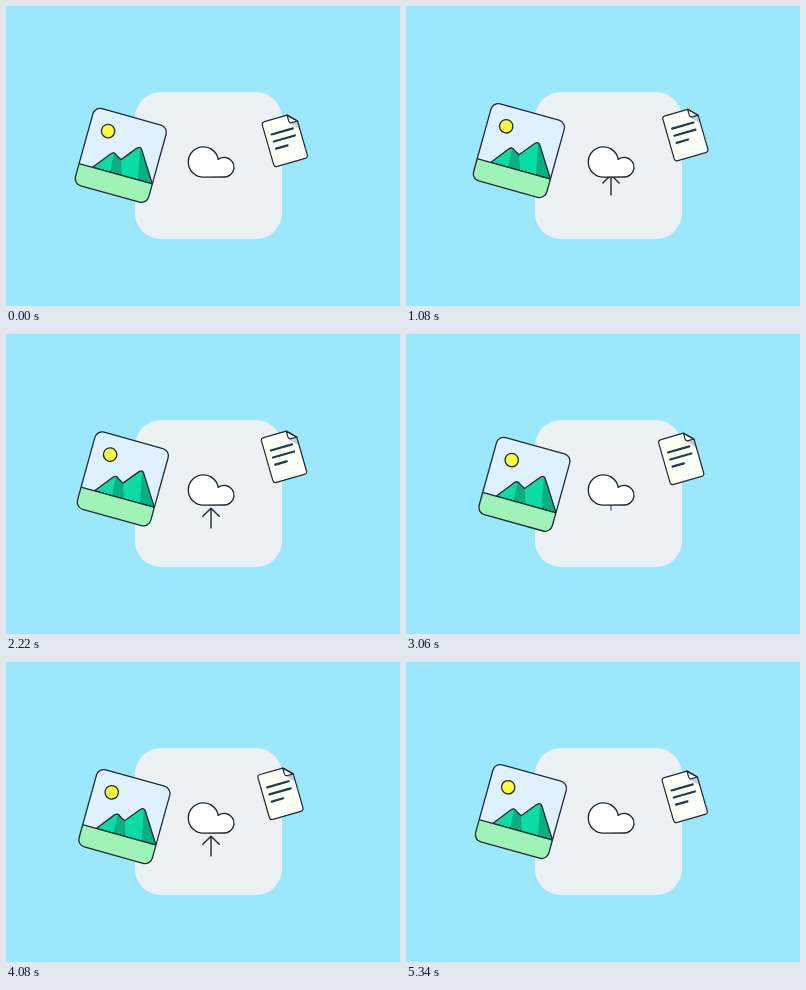
Write an HTML page with a canvas that moves like this. It is 394 by 300 pixels and loops after 5370 ms.

```html
<!DOCTYPE html>
<html lang="en">
<head>
<meta charset="utf-8">
<title>Cloud upload</title>
<style>
html, body { margin: 0; width: 100%; height: 100%; overflow: hidden; background: #9be8fc; }
canvas { display: block; width: 394px; height: 300px; }
</style>
</head>
<body>
<canvas id="stage"></canvas>
<script>
const W = 394, H = 300, LOOP = 5370, ARROW_LOOP = LOOP / 3;
const INK = '#1e2a34';
const canvas = document.getElementById('stage');
const ctx = canvas.getContext('2d');
const ratio = window.devicePixelRatio || 1;
canvas.width = W * ratio;
canvas.height = H * ratio;

// Drift paths: [time, dx, dy], closed over one loop
const photoPath = [[0, 0, 0], [630, -2.5, -2.7], [1530, -0.6, -6.3], [2220, 2, -4.5], [3060, 3.6, 0.9], [4080, 3.6, 5.2]];
const pagePath = [[0, 0, 0], [630, 0.5, -3], [1530, 0.4, -8.6], [2220, -0.8, -12], [3060, -3.6, -10], [4080, -4.3, -3.1]];

function knot(path, i) {
  const n = path.length, lap = Math.floor(i / n);
  const [t, x, y] = path[i - lap * n];
  return [t + lap * LOOP, x, y];
}

function drift(path, t) {
  let i = path.length - 1;
  while (path[i][0] > t) i--;
  const [a, b, c, d] = [-1, 0, 1, 2].map(k => knot(path, i + k));
  const span = c[0] - b[0], s = (t - b[0]) / span;
  return [1, 2].map(k => {
    const m0 = (c[k] - a[k]) / (c[0] - a[0]) * span;
    const m1 = (d[k] - b[k]) / (d[0] - b[0]) * span;
    const s2 = s * s, s3 = s2 * s;
    return (2 * s3 - 3 * s2 + 1) * b[k] + (s3 - 2 * s2 + s) * m0
      + (3 * s2 - 2 * s3) * c[k] + (s3 - s2) * m1;
  });
}

function ease(t, from, to) {
  const s = Math.min(1, Math.max(0, (t - from) / (to - from)));
  return s * s * (3 - 2 * s);
}

function fill(color, path) {
  ctx.fillStyle = color;
  ctx.fill(path);
}

function line(path, width = 1.3, color = INK) {
  ctx.lineWidth = width;
  ctx.strokeStyle = color;
  ctx.stroke(path);
}

function shape(d) {
  return new Path2D(d);
}

function roundRect(x, y, w, h, r) {
  const p = new Path2D();
  p.roundRect(x, y, w, h, r);
  return p;
}

function circle(x, y, r) {
  const p = new Path2D();
  p.arc(x, y, r, 0, Math.PI * 2);
  return p;
}

function placed(x, y, degrees, draw) {
  ctx.save();
  ctx.translate(x, y);
  ctx.rotate(degrees * Math.PI / 180);
  draw();
  ctx.restore();
}

const card = roundRect(129, 86, 147, 147, 26);
const frame = roundRect(-38, -40, 76, 80, 7.5);
const sun = circle(-18.7, -20, 6.7);
const hills = shape('M-24 19 L-10 1 Q-7.3 -2 -4.5 0.8 L1.3 4 L13.4 -11 Q16.6 -14.5 19 -10.5 L38 19 Z');
const leftShade = shape('M-7.2 -0.8 Q-5.5 -0.5 -4.5 0.8 L1.3 4 L6.5 19 L-6 19 Z');
const rightShade = shape('M16.6 -12.8 Q18 -12.3 19 -10.5 L38 19 L23 19 Z');

function drawPhoto() {
  ctx.save();
  ctx.clip(frame);
  fill('#dff1ff', frame);
  fill('#0bdba4', hills);
  fill('#0eae83', leftShade);
  fill('#0eae83', rightShade);
  line(hills);
  fill('#9ff3b6', shape('M-40 19 H40 V42 H-40 Z'));
  line(shape('M-40 19 H40'));
  ctx.restore();
  fill('#fdf940', sun);
  line(sun);
  line(frame);
}

const sheet = shape('M-14.5 -24 H9 L17.5 -15.5 V19.6 Q17.5 22.6 14.5 22.6 H-14.5 Q-17.5 22.6 -17.5 19.6 V-21 Q-17.5 -24 -14.5 -24 Z');
const flap = shape('M9 -24 V-18 Q9 -15.5 11.5 -15.5 H17.5 Z');
const flapShade = shape('M9.5 -15.5 H17.5 V-6.5 Z');
const textLines = shape('M-11.2 -9.7 H11 M-11 -2.3 H11 M-10.8 5.2 H1.2');

function drawPage() {
  fill('#fcfff5', sheet);
  fill('#c6cfd3', flapShade);
  fill('#ffffff', flap);
  line(flap, 1.2);
  line(sheet, 1.2);
  line(textLines, 2.2, '#223d47');
}

const cloud = new Path2D();
cloud.arc(197.4, 156, 15.1, Math.PI / 2, -0.18);
cloud.arc(218.2, 161.2, 9.8, -2.24, Math.PI / 2);
cloud.closePath();
const arrow = shape('M205 194 V174.3 M196.8 182.2 L205 174.2 L213.2 182.2');

function drawArrow(t) {
  const enter = ease(t, 130, 400), leave = ease(t, 950, 1340);
  ctx.save();
  ctx.globalAlpha = enter * (1 - ease(t, 1180, 1400));
  ctx.translate(0, 8 * (1 - enter) - 19.5 * leave);
  line(arrow, 1.4);
  ctx.restore();
}

function draw(now) {
  const t = now % LOOP;
  ctx.setTransform(ratio, 0, 0, ratio, 0, 0);
  ctx.lineCap = ctx.lineJoin = 'round';
  ctx.fillStyle = '#9be8fc';
  ctx.fillRect(0, 0, W, H);
  fill('#ecf1f4', card);
  drawArrow(t % ARROW_LOOP);
  fill('#ffffff', cloud);
  line(cloud, 1.4);
  const [ax, ay] = drift(photoPath, t);
  placed(114.8 + ax, 149.4 + ay, 15.5, drawPhoto);
  const [bx, by] = drift(pagePath, t);
  placed(279 + bx, 134.7 + by, -16, drawPage);
}

const start = performance.now();
function tick() {
  draw(performance.now() - start);
  requestAnimationFrame(tick);
}
tick();
</script>
</body>
</html>
```
